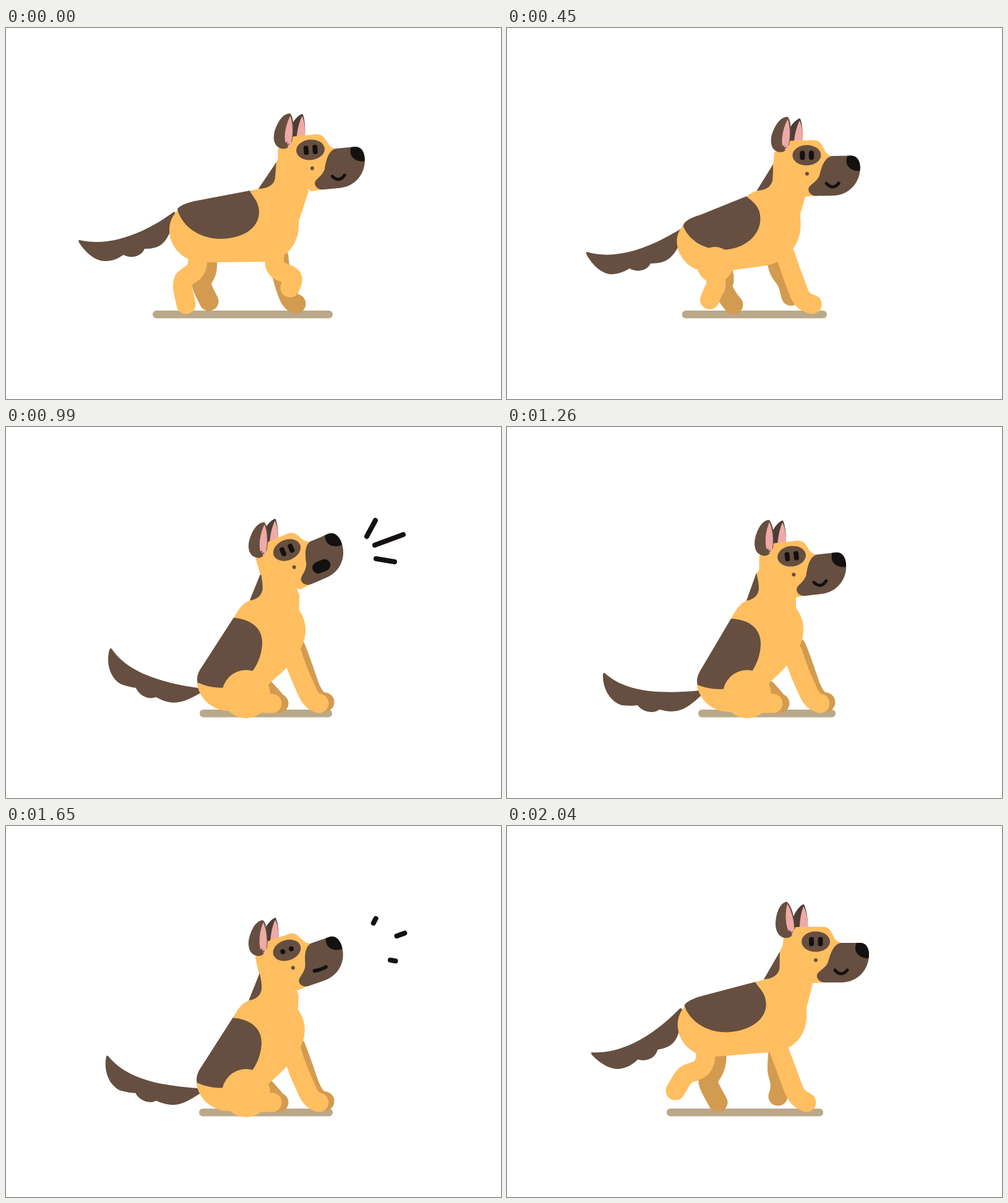
Animation, 800 px wide and 600 px high, one loop 2.07 s. Source, as an HTML page:

```html
<!DOCTYPE html>
<html lang="en">
<head>
<meta charset="utf-8">
<title>Dog</title>
<style>
  html, body { margin: 0; width: 100%; height: 100%; overflow: hidden; background: #fff; }
  svg { display: block; width: 100vw; height: 100vh; }
  .coat { fill: #ffbe60; }
  .dark { fill: #664f40; }
  .deep { fill: #4c3e37; }
  .pink { fill: #efaaa6; }
  .ink { fill: #141110; }
  .leg, .line { fill: none; stroke-width: 31; stroke-linecap: round; stroke-linejoin: round; }
  .near { stroke: #ffbe60; }
  .far { stroke: #d29b50; }
  .line { stroke: #141110; stroke-width: 8; }
</style>
</head>
<body>
<svg viewBox="0 0 800 600">
  <rect id="ground" y="457" height="12.5" rx="6" fill="#baa88a"/>
  <g id="tailBody"><path id="tail" class="dark"/></g>
  <path id="farHind" class="leg far"/>
  <path id="farFront" class="leg far"/>
  <g id="farEar">
    <path class="deep" d="M4-36C-4-32-12-18-13-9L-12 5H12C13-12 10-28 6-36Q5-37 4-36Z"/>
    <path class="pink" d="M5-33C1-22-1-10-1 4H13C12-12 10-26 5-33Z"/>
  </g>
  <g id="torso">
    <path id="body" class="coat"/>
    <path id="saddle" class="dark"/>
    <path id="mane" class="dark"/>
  </g>
  <circle id="haunch" class="coat"/>
  <path id="nearHind" class="leg near"/>
  <path id="nearFront" class="leg near"/>
  <g id="head">
    <path class="coat" d="M-38-20Q-34-24-26-24H12C26-24 26-8 34-1L42 3L22 40L12 66L-5 67L-55 20L-52-6Z"/>
    <ellipse class="dark" rx="23" ry="16.5"/>
    <rect id="eyeL" class="ink" x="-11" width="8" rx="3.7"/>
    <rect id="eyeR" class="ink" x="3.5" width="8" rx="3.7"/>
    <circle class="dark" cy="30" r="3"/>
    <path class="dark" d="M41 2H73C83 3 86 13 86 21C86 45 68 66 41 66H15C3 66-1 55 4 50C9 45 16 42 20 33C24 18 29 4 41 2Z"/>
    <path class="ink" d="M66 2H73C83 3 86 13 86 21Q86 25 85 27C73 27 64 20 64 11Q64 5 66 2Z"/>
    <path id="mouth" class="line"/>
    <g id="nearEar">
      <path class="dark" d="M0-44C-11-40-16-22-16-7C-15 7-8 14 1 14C6 14 9 12 11 9L10 6L13 5L12 2L15 0C15-18 11-36 3-44Q1-45 0-44Z"/>
      <path class="pink" d="M3-41C9-32 14-15 14-2V8H10L12 3L8 5V1L5 3C0-8-1-26 3-41Z"/>
    </g>
  </g>
  <path id="bark" class="line"/>
</svg>
<script>
const LOOP = 2070, STEP = 30;
const el = Object.fromEntries([...document.querySelectorAll('[id]')].map(n => [n.id, n]));
const set = (id, attrs) => { for (const k in attrs) el[id].setAttribute(k, attrs[k]); };
const numbers = text => text.match(/-?[\d.]+/g).map(Number);
const mix = (a, b, k) => a.map((v, i) => v + (b[i] - v) * k);

// Smooth track through keys [time, ...values] that never overshoots a key.
function track(...keys) {
  const slope = (i, c) => (keys[i + 1][c] - keys[i][c]) / (keys[i + 1][0] - keys[i][0]);
  const tangent = (i, c) => {
    if (i === 0 || i === keys.length - 1) return 0;
    const a = slope(i - 1, c), b = slope(i, c);
    return a * b > 0 ? 2 * a * b / (a + b) : 0;
  };
  return t => {
    const last = keys.length - 1;
    if (t <= keys[0][0]) return keys[0].slice(1);
    if (t >= keys[last][0]) return keys[last].slice(1);
    const i = keys.findIndex((k, n) => n < last && t < keys[n + 1][0]);
    const p = keys[i], q = keys[i + 1], span = q[0] - p[0], u = (t - p[0]) / span, v = 1 - u;
    return p.slice(1).map((value, n) => {
      const c = n + 1;
      return (1 + 2 * u) * v * v * value + u * v * v * span * tangent(i, c)
        + u * u * (3 - 2 * u) * q[c] - u * u * v * span * tangent(i + 1, c);
    });
  };
}

// Blend between a standing and a sitting outline of the same structure.
function morph(stand, sit) {
  const a = numbers(stand), b = numbers(sit);
  return k => {
    const values = mix(a, b, k);
    let i = 0;
    return stand.replace(/-?[\d.]+/g, () => values[i++].toFixed(2));
  };
}

const shapes = {
  body: morph(
    'M450 195L437 217L408 260Q402 262 395 263L310 279C285 284 264 300 264 327C264 350 280 367 294 373L325 379L417 378C450 378 474 350 473 318C473 312 474 309 476 304L489 264L480 235Z',
    'M420 215L403 237L387 281Q374 286 363 309L316 388C307 402 306 412 308 422C314 445 335 461 360 461L385 457L427 411C455 385 480 358 479 325C478 308 472 300 467 293L467 270L455 240Z'),
  saddle: morph(
    'M277 293C279 288 292 282 310 279L394 263C399 274 409 280 409 298C409 325 380 341 347 341C310 341 283 318 277 293Z',
    'M308 417C305 405 311 396 316 388L362 310C390 311 411 325 410 352C409 385 385 424 345 424C330 424 318 421 308 417Z'),
  mane: morph(
    'M437 217L408 260C425 260 435 252 435 240C436 232 436 224 437 217Z',
    'M403 236L387 281C400 279 407 270 407 261C407 252 405 244 403 236Z'),
  tail: morph(
    'M119 343C162 353 215 338 272 297L290 320L266 328C257 349 248 357 224 357C218 371 200 373 190 367C183 371 175 377 160 377C145 377 130 365 118 347C117 344 117 342 119 343Z',
    'M158 398C190 427 240 433 312 426L330 430L316 432C285 462 272 463 246 457C238 464 220 462 211 450C206 451 195 451 186 450C168 445 155 425 155 402C155 398 156 397 158 398Z')
};

// Each leg: hip, two bends and paw, at two strides, crouch, sit and rise.
function leg(start, stride, crouch, sit, rise) {
  const key = (t, text) => [t, ...numbers(text)];
  return track(key(0, start), key(300, stride), key(600, crouch), key(720, sit), key(1710, sit), key(2040, rise));
}
const legs = {
  nearHind: leg(
    '310 370 312 400 292 398 287 408 283 416 287 428 291 447',
    '308 370 308 402 290 402 282 404 271 406 270 418 262 432',
    '375 424 380 438 390 442 395 444 402 446 406 447 411 447',
    '388 432 390 440 395 446 400 447 410 447 420 447 430 447',
    '321 368 322 398 300 396 294 400 284 404 282 412 272 428'),
  farHind: leg(
    '325 375 328 400 318 402 316 412 316 420 322 430 328 442',
    '326 372 328 400 316 400 316 412 318 425 325 435 332 448',
    '385 420 395 425 396 425 397 425 405 435 412 446 416 447',
    '405 425 415 425 417 424 419 424 430 435 438 447 441 447',
    '339 370 340 395 328 402 325 412 325 420 333 432 341 447'),
  nearFront: leg(
    '434 365 432 388 438 392 447 395 466 402 466 404 459 420',
    '441 365 448 385 455 402 462 420 468 436 472 442 484 447',
    '458 365 463 385 470 405 478 424 484 437 490 445 501 447',
    '462 365 468 385 476 405 485 424 490 437 496 445 506 447',
    '438 358 446 380 454 400 461 420 467 436 472 442 484 447'),
  farFront: leg(
    '441 370 442 385 446 402 450 415 456 432 458 443 469 446',
    '414 368 409 388 412 394 418 397 432 407 427 420 419 432',
    '462 360 468 375 474 390 480 405 488 420 494 434 507 437',
    '468 356 476 375 484 400 491 420 498 436 504 444 515 445',
    '438 365 436 388 436 396 438 402 442 415 443 425 438 437')
};

// Eye patch position and tilt.
const head = track([0, 492, 197, -5.5], [210, 495, 188, -1], [300, 496, 202, 3], [420, 488, 205, 0],
  [600, 463, 209, -6], [780, 460, 209, -6.5], [930, 455, 200, -21], [990, 454, 199, -23],
  [1080, 454, 201, -19], [1260, 460, 209, -6.5], [1380, 460, 209, -6.5], [1500, 455, 200, -21],
  [1560, 454, 199, -23], [1650, 454, 201, -19], [1750, 460, 205, -9], [1920, 491, 190, -3], [2040, 499, 187, 0]);
// Upright angle and shift.
const ears = track([0, 13, 0], [210, 4, -4], [300, 20, 0], [600, 7.5, 0], [780, 8.4, 0], [990, 11.5, 0],
  [1080, 8.4, 0], [1380, 8.4, 0], [1560, 11.5, 0], [1650, 8.4, 0], [1880, 8, 0], [2040, 0, -6]);
// Amount of sitting, shift and tilt.
const torso = track([0, 0, 0, 0, 0], [210, 0, 1, -11, -1], [300, 0, 0, -3, 0], [450, .25, -1, -4, 1],
  [600, 1, -5, -9, 4], [720, 1, 0, 0, 0], [840, 1, 0, 0, 0], [990, 1, 3, -4, 2.3], [1080, 1, 2, -2, 2],
  [1260, 1, 0, 0, 0], [1380, 1, 0, 0, 0], [1560, 1, 3, -4, 2.3], [1650, 1, 2, -2, 2],
  [1710, 1, 1, -1, 1], [1940, .08, 11, -4, -3], [2040, 0, 15.6, -4.6, -4]);
const wag = track([0, 0], [210, -3], [300, 1], [600, -10.6], [780, -2], [990, 11.5], [1080, 7.3],
  [1260, 0], [1380, 0], [1560, 11.5], [1650, 7.3], [2040, -6]);
const haunch = track([0, 308, 352, 18], [300, 308, 350, 18], [600, 375, 424, 40], [720, 388, 432, 39],
  [1710, 388, 432, 39], [2040, 320, 348, 18]);
const ground = track([0, 237, 528], [300, 258, 508], [600, 304, 528], [780, 309, 531], [990, 313, 527],
  [1080, 312, 528], [1260, 309, 531], [1380, 309, 531], [1560, 313, 527], [1650, 312, 528], [2040, 258, 511]);

// Bark tracks, with time measured from the widest mouth.
const mouthOpen = track([-130, 0], [-40, 1], [0, 1], [90, .07], [140, 0]);
const eyeHeight = track([30, 15], [90, 8], [115, 5], [180, 15]);
const burst = track([-120, 0, 0], [-30, 0, .9], [0, 0, 1], [40, .2, 1.05], [90, .77, 1.05], [130, 1.05, 1.05]);
const rays = [[583, 177, 597, 151], [596, 191, 642, 174], [598, 213, 628, 218]];

function draw(t) {
  const [sit, dx, dy, tilt] = torso(t);
  const [hx, hy, nod] = head(t);
  const [earAngle, earShift] = ears(t);
  const sinceBark = t - (t < 1275 ? 990 : 1560);
  const pose = `translate(${dx} ${dy}) rotate(${tilt} 300 380)`;
  const headPose = `translate(${hx} ${hy}) rotate(${nod})`;

  for (const id in shapes) set(id, { d: shapes[id](sit) });
  set('torso', { transform: pose });
  set('tailBody', { transform: pose });
  set('tail', { transform: `rotate(${wag(t)} ${mix([268, 312], [312, 428], sit)})` });
  for (const id in legs) {
    const p = legs[id](t);
    set(id, { d: `M${p.slice(0, 2)}C${p.slice(2, 8)} ${p.slice(8)}` });
  }
  const [cx, cy, r] = haunch(t);
  set('haunch', { cx, cy, r });
  const [left, right] = ground(t);
  set('ground', { x: left, width: right - left });

  set('head', { transform: headPose });
  set('nearEar', { transform: `translate(${-43 + earShift} -20) rotate(${earAngle - nod})` });
  set('farEar', { transform: `${headPose} translate(${-19 + earShift} -24) rotate(${.35 * earAngle - nod})` });
  const [height] = eyeHeight(sinceBark);
  for (const id of ['eyeL', 'eyeR']) set(id, { y: -height / 2, height });

  const [open] = mouthOpen(sinceBark);
  const half = 10 - 4.5 * open, smile = 12 * Math.max(0, 1 - open * 12);
  set('mouth', {
    d: `M${41 - half} 46Q41 ${46 + smile} ${41 + half} 46`,
    style: `stroke-width:${5 + 14 * open}`
  });

  const [from, to] = burst(sinceBark);
  set('bark', {
    d: to - from < .02 ? '' : rays.map(ray => {
      const a = ray.slice(0, 2), b = ray.slice(2);
      return `M${mix(a, b, from)}L${mix(a, b, to)}`;
    }).join('')
  });
}

function tick() {
  draw(Math.floor(performance.now() % LOOP / STEP) * STEP);
  requestAnimationFrame(tick);
}
tick();
</script>
</body>
</html>
```
